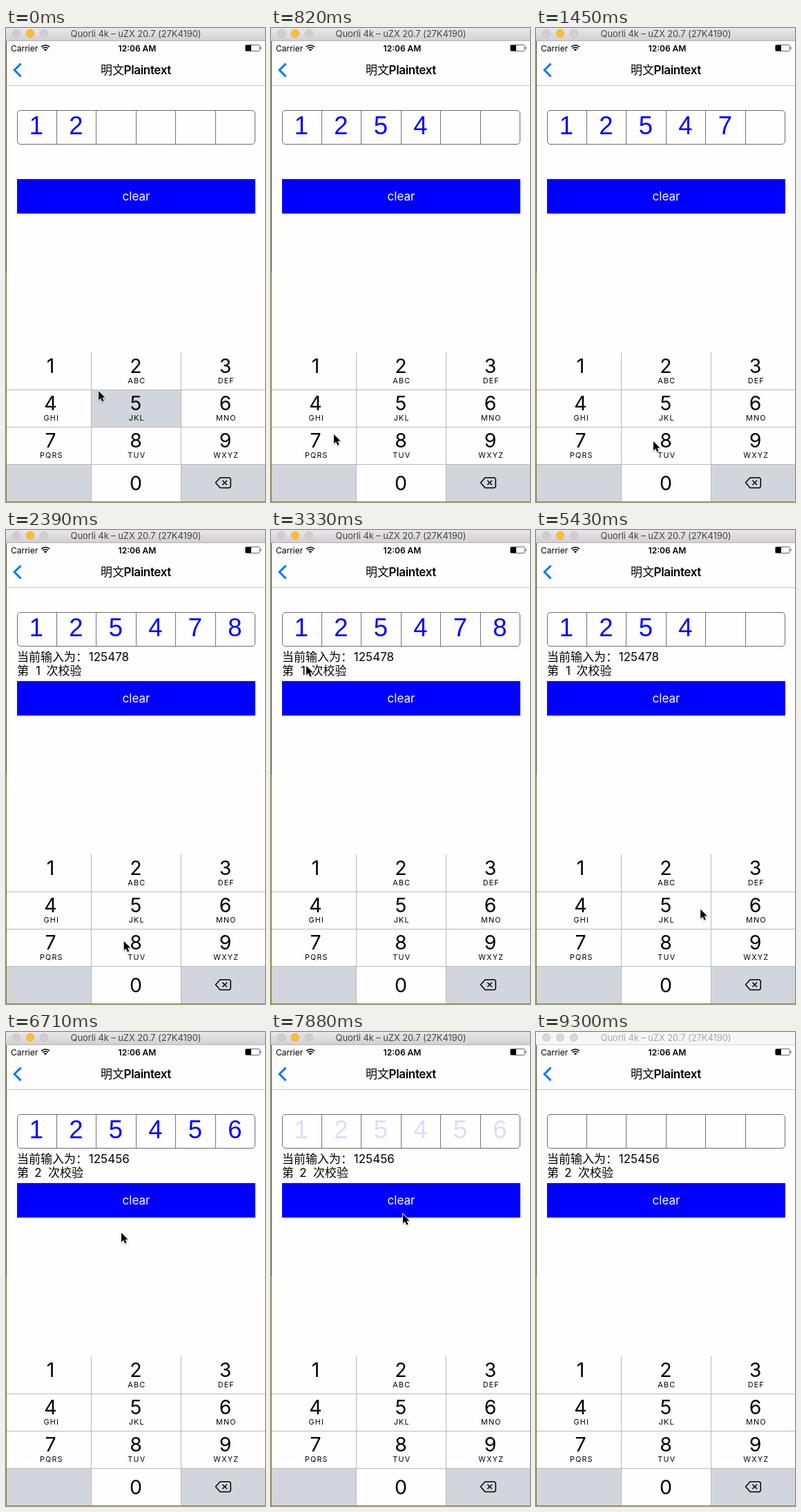
Recreate the animation shown at these times as an HTML page with a canvas. Size 375 by 687 pixels, loop 9400 ms.

```html
<!DOCTYPE html>
<html lang="zh">
<head>
<meta charset="utf-8">
<title>Passcode input</title>
<style>
html, body { margin: 0; width: 100%; height: 100%; overflow: hidden; background: #fff; }
canvas { display: block; width: 375px; height: 687px; }
</style>
</head>
<body>
<canvas id="stage"></canvas>
<script>
const W = 375, H = 687, LOOP = 9400;
const SANS = "Inter, 'Noto Sans CJK SC', 'Noto Sans CJK', sans-serif";
const CELL_FONT = "'Liberation Sans', Arial, sans-serif";
const KEY_GREY = '#d2d5db', BLUE = '#0000ff';

// Timing in ms
const HOLD = 170, LAG = 110, FADE = 220, CLEAR_AT = 7690, INACTIVE_AT = 9300;

const KEY_ROWS = ['1 2 3', '4 5 6', '7 8 9', '- 0 del'].map(row => row.split(' '));
const LETTERS = { 2: 'ABC', 3: 'DEF', 4: 'GHI', 5: 'JKL', 6: 'MNO', 7: 'PQRS', 8: 'TUV', 9: 'WXYZ' };
const COLUMNS = [{ x: 1, mid: 64.5 }, { x: 124, mid: 188 }, { x: 254, mid: 317.5 }];

const taps = [
  { at: 0, key: '5' }, { at: 470, key: '4' }, { at: 1050, key: '7' }, { at: 1690, key: '8' },
  { at: 4460, key: 'del' }, { at: 5040, key: 'del' }, { at: 5500, key: '5' }, { at: 5790, key: '6' }
];

// Pointer moves: leave, arrive, x, y, sideways bow
const moves = [
  [0, 1, 133, 525],
  [120, 400, 92, 545],
  [620, 850, 90, 590],
  [1210, 1450, 169, 598],
  [2380, 2620, 143, 92, 45],
  [2870, 3190, 40, 190],
  [3220, 3510, 71, 208],
  [3640, 4280, 300, 654, 110],
  [5200, 5460, 235, 545],
  [5630, 5790, 278, 546],
  [6420, 6710, 166, 290],
  [7020, 7540, 190, 263],
  [8250, 8480, 300, 627],
  [8670, 8950, 323, 692]
];

const canvas = document.getElementById('stage');
const ctx = canvas.getContext('2d');
const dpr = window.devicePixelRatio || 1;
canvas.width = W * dpr;
canvas.height = H * dpr;

const clamp = v => Math.max(0, Math.min(1, v));
const ease = v => v * v * (3 - 2 * v);
const isDown = (key, t) => taps.some(tap => tap.key === key && t >= tap.at && t < tap.at + HOLD);

// Replays the taps into fading digits and the checks made whenever six are filled.
function replay() {
  const digits = [], checks = [];
  let open = [];
  const add = (char, on) => {
    const digit = { char, cell: open.length, on, off: CLEAR_AT };
    digits.push(digit);
    open.push(digit);
  };
  add('1', -LOOP);
  add('2', -LOOP);
  for (const { at, key } of taps) {
    if (key === 'del') open.pop().off = at + LAG;
    else add(key, at + LAG);
    if (open.length === 6) checks.push({ at: at + LAG, code: open.map(d => d.char).join('') });
  }
  return { digits, checks };
}
const { digits, checks } = replay();

function rect(x, y, w, h, color) {
  ctx.fillStyle = color;
  ctx.fillRect(x, y, w, h);
}

function text(str, x, y, size, { color = '#000', weight = 400, align = 'center', space = 0, family = SANS } = {}) {
  ctx.font = `${weight} ${size}px ${family}`;
  ctx.letterSpacing = space + 'px';
  ctx.textAlign = align;
  ctx.fillStyle = color;
  ctx.fillText(str, x, y);
}

function path(points, close) {
  ctx.beginPath();
  points.forEach(([x, y]) => ctx.lineTo(x, y));
  if (close) ctx.closePath();
}

function stroke(color, width) {
  ctx.strokeStyle = color;
  ctx.lineWidth = width;
  ctx.stroke();
}

function drawTitleBar(active) {
  const grad = ctx.createLinearGradient(0, 0, 0, 18);
  grad.addColorStop(0, active ? '#e9e7e9' : '#f6f6f6');
  grad.addColorStop(1, active ? '#d2d0d2' : '#f6f6f6');
  rect(0, 0, W, 18, grad);
  rect(0, 18, W, 1, active ? '#b4b2b4' : '#d6d6d6');
  for (let i = 0; i < 3; i++) {
    const lit = active && i === 1;
    ctx.beginPath();
    ctx.arc(15 + i * 20, 7.8, 5.6, 0, 7);
    ctx.fillStyle = lit ? '#fdbd2e' : active ? '#d0ced0' : '#d8d8d8';
    ctx.fill();
    stroke(lit ? '#e6a935' : active ? '#c0bec0' : '#c8c8c8', 0.8);
  }
  text('Quorli 4k – uZX 20.7 (27K4190)', 188, 13, 13, { color: active ? '#454545' : '#a9a9a9', space: -0.1 });
}

function drawStatusBar() {
  text('Carrier', 7, 33.5, 12, { align: 'left' });
  text('12:06 AM', 190, 33.5, 12, { weight: 600 });
  for (const r of [8.4, 5.4]) {
    ctx.beginPath();
    ctx.arc(57, 33.4, r, -Math.PI * 0.75, -Math.PI * 0.25);
    stroke('#000', 1.7);
  }
  ctx.beginPath();
  ctx.moveTo(57, 33.6);
  ctx.arc(57, 33.6, 3.2, -Math.PI * 0.75, -Math.PI * 0.25);
  ctx.fillStyle = '#000';
  ctx.fill();
  ctx.beginPath();
  ctx.roundRect(346.5, 24.5, 21, 9, 1.8);
  stroke('#666', 1);
  rect(347, 25, 8, 8, '#000');
  rect(368.5, 27.5, 1.2, 3, '#666');
}

function drawNavBar() {
  path([[21.6, 51.6], [12.2, 61], [21.6, 70.4]]);
  stroke('#007aff', 3);
  text('明文', 137, 67, 17, { weight: 500, align: 'left' });
  text('Plaintext', 170.6, 67, 17, { weight: 600, align: 'left', space: -0.35 });
  rect(1, 83, W - 1, 1, '#c8c8c8');
}

function drawCells(t) {
  ctx.beginPath();
  ctx.roundRect(16.5, 119.5, 344, 49, 4.5);
  stroke('#6c6c6c', 1);
  for (let i = 1; i < 6; i++) rect(Math.ceil(16 + i * 57.5) - 1, 120, 1, 48, '#747474');
  for (const { char, cell, on, off } of digits) {
    ctx.globalAlpha = clamp((t - on) / FADE) * (1 - clamp((t - off) / FADE));
    text(char, 44 + 57.5 * cell, 154, 36.5, { color: BLUE, family: CELL_FONT });
  }
  ctx.globalAlpha = 1;
}

function drawResult(t) {
  const done = checks.filter(check => t >= check.at);
  if (!done.length) return;
  const left = { align: 'left' };
  text('当前输入为：', 16, 190, 17, left);
  text(done[done.length - 1].code, 119.8, 190, 17, left);
  text('第', 16, 210, 17, left);
  text(done.length, 46.5, 210, 17);
  text('次校验', 56 + 2.5 * done.length, 210, 17, left);
}

function drawDelete() {
  ctx.lineJoin = 'round';
  path([[303.5, 659], [310, 651.7], [323.5, 651.7], [325.3, 653.5], [325.3, 664.8], [323.5, 666.6], [310, 666.6]], true);
  stroke('#000', 1.5);
  for (const s of [-1, 1]) {
    path([[316.7 - 3.3, 659 - 3.3 * s], [316.7 + 3.3, 659 + 3.3 * s]]);
    stroke('#000', 1.5);
  }
  ctx.lineJoin = 'miter';
}

function drawKeypad(t) {
  KEY_ROWS.forEach((row, r) => row.forEach((key, c) => {
    const { x, mid } = COLUMNS[c], top = 470 + r * 54;
    const special = key === '-' || key === 'del';
    rect(x, top, 130, 54, special !== isDown(key, t) ? KEY_GREY : '#fefefe');
    if (key === 'del') drawDelete();
    else if (!special) text(key, mid, top + (r === 3 ? 37.5 : 30), 28.5);
    text(LETTERS[key] || '', mid + 1.3, top + 45, 10.8, { space: 1.2 });
  }));
  for (let y = 524; y < 640; y += 54) rect(1, y, W - 1, 1, '#b9b9bb');
  for (const x of [123, 253]) rect(x, 470, 1, 216, '#b9b9bb');
}

function drawBackdropEdge() {
  rect(0, 19, 1, 335, '#5c5420');
  rect(0, 354, 1, H - 354, '#948212');
  rect(0, 686, W, 1, '#a3943c');
}

function pointerAt(t) {
  let x = 0, y = 0;
  for (const [leave, arrive, toX, toY, bow = 0] of moves) {
    const k = ease(clamp((t - leave) / (arrive - leave)));
    x += (toX - x) * k + bow * Math.sin(Math.PI * k);
    y += (toY - y) * k;
  }
  return t < 1 ? [moves[0][2], moves[0][3]] : [x, y];
}

function drawPointer(t) {
  const [x, y] = pointerAt(t);
  ctx.save();
  ctx.translate(x + 1, y + 1);
  path([[0, 0], [0, 13.4], [3, 10.5], [5.3, 15.6], [7.6, 14.6], [5.4, 9.7], [9.5, 9.5]], true);
  ctx.shadowColor = 'rgba(0,0,0,.3)';
  ctx.shadowBlur = 2 * dpr;
  ctx.shadowOffsetY = dpr;
  stroke('#fff', 1.6);
  ctx.shadowColor = 'transparent';
  ctx.fillStyle = '#000';
  ctx.fill();
  ctx.restore();
}

function draw(t) {
  ctx.setTransform(dpr, 0, 0, dpr, 0, 0);
  rect(0, 0, W, H, '#fefefe');
  drawTitleBar(t < INACTIVE_AT);
  drawStatusBar();
  drawNavBar();
  drawCells(t);
  drawResult(t);
  rect(16, 219, 345, 50, BLUE);
  text('clear', 188.5, 250, 17, { color: '#fff' });
  drawKeypad(t);
  drawBackdropEdge();
  drawPointer(t);
}

const start = performance.now();
function tick() {
  draw((performance.now() - start) % LOOP);
  requestAnimationFrame(tick);
}
tick();
</script>
</body>
</html>
```
